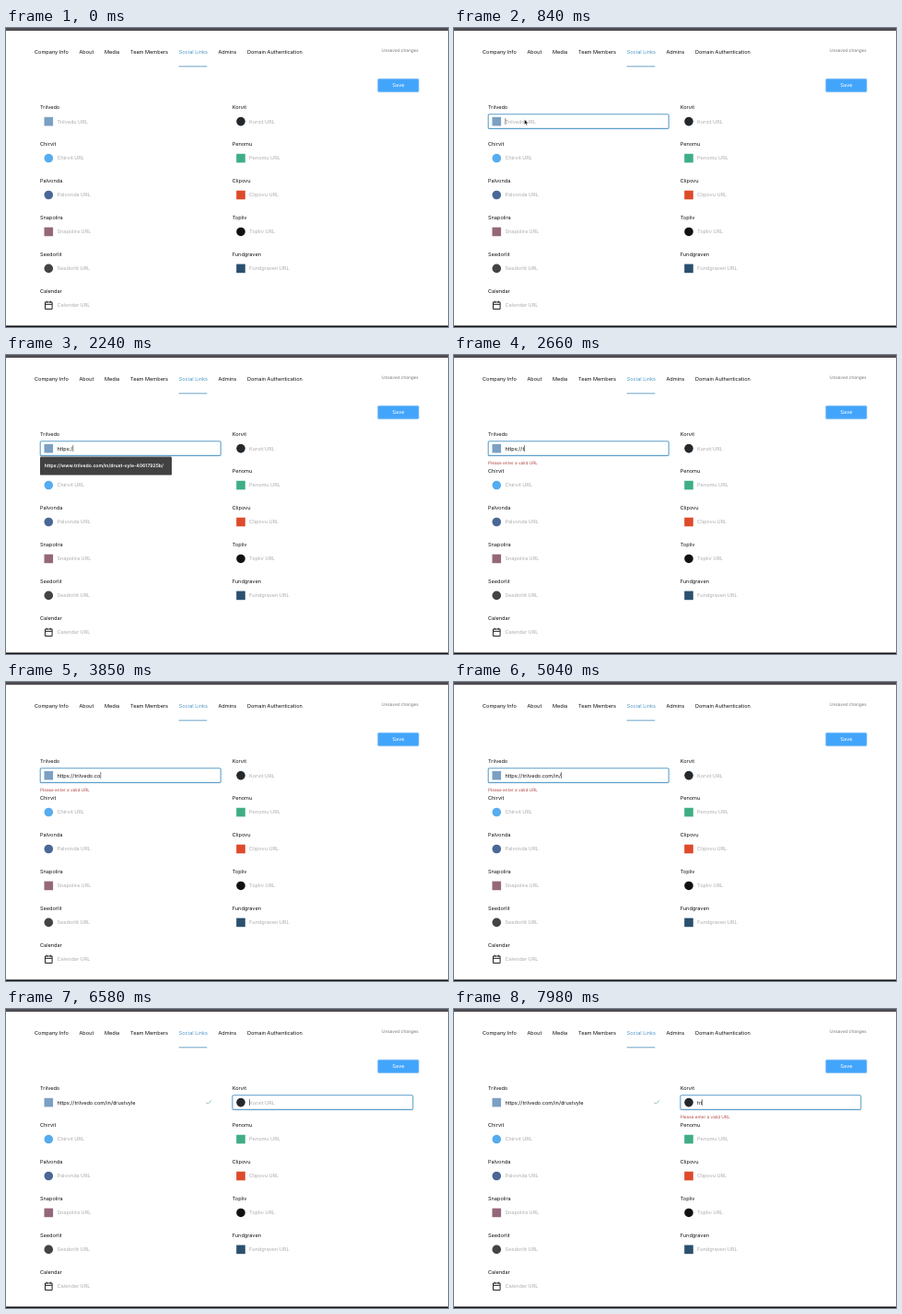
Write an HTML page that moves like this. It is 480 by 325 pixels and loops after 8000 ms.

```html
<!DOCTYPE html>
<html lang="en">
<head>
<meta charset="utf-8">
<title>Social links form</title>
<style>
  html, body { margin: 0; width: 100%; height: 100%; overflow: hidden; background: #fff; }
  svg { display: block; width: 480px; height: 325px; }
  text { font: 400 5.58px Inter, sans-serif; fill: #111; text-rendering: geometricPrecision; white-space: pre; }
  .hint { font-size: 5.5px; font-weight: 500; fill: #b8b8b8; }
  .value { font-size: 5.6px; }
  .active { fill: #4f96c8; }
  .note { font-size: 4.72px; fill: #777; }
  .error { font-size: 4.72px; fill: #b04a42; }
  .save { fill: #fff; text-anchor: middle; }
  .tip { font-size: 5.1px; font-weight: 600; fill: #fff; }
</style>
</head>
<body>
<svg id="stage" viewBox="0 0 480 325">
  <rect width="480" height="325" fill="#fff"/>
  <rect width="480" height="3" fill="#504d52"/>
  <rect y="323.5" width="480" height="1.5" fill="#111"/>
</svg>
<script>
const LOOP = 8000;
const stage = document.getElementById('stage');

function add(tag, attrs, content = '') {
  const node = document.createElementNS('http://www.w3.org/2000/svg', tag);
  for (const key in attrs) node.setAttribute(key, attrs[key]);
  node.textContent = content;
  return stage.appendChild(node);
}
const label = (x, y, content, cls = '') => add('text', { x, y, class: cls }, content);
const show = (node, opacity) => node.setAttribute('opacity', Number(opacity));
const clamp = v => Math.min(1, Math.max(0, v));

// Header
[[31, 'Company Info'], [79.5, 'About'], [107, 'Media'], [135, 'Team Members'],
 [187.7, 'Social Links', 'active'], [230.5, 'Admins'], [262, 'Domain Authentication']]
  .forEach(([x, name, cls]) => label(x, 27.7, name, cls));
add('rect', { x: 187.7, y: 41.3, width: 30.6, height: 1, fill: '#6aa6c6' });
label(408, 26.4, 'Unsaved changes', 'note');
add('rect', {
  x: 403.8, y: 55.2, width: 44.4, height: 14.2, rx: 1.2,
  fill: '#42a5fb', stroke: '#7dbdf3', 'stroke-width': .6
});
label(426, 64.3, 'Save', 'save');

// Form
function icon(x, y, shape, fill) {
  if (shape === 'circle') add('circle', { cx: x, cy: y, r: 4.8, fill });
  else if (shape === 'square') add('rect', { x: x - 4.8, y: y - 4.8, width: 9.6, height: 9.6, fill });
  else add('path', {
    d: `M${x - 3.8} ${y - 3.4}h7.6v7.6h-7.6zM${x - 3.8} ${y - 1}h7.6M${x - 2} ${y - 4.7}v2M${x + 2} ${y - 4.7}v2`,
    fill: 'none', stroke: '#222', 'stroke-width': 1
  });
}

function field(left, row, [name, shape, color]) {
  const y = 101.6 + row * 39.95;
  const textX = left + 18.4;
  label(left, y - 13.4, name);
  const ring = add('rect', {
    x: left + .2, y: y - 7.9, width: 196, height: 15.7, rx: 1.2,
    fill: '#fff', stroke: '#5d9fca', 'stroke-width': 1.1, opacity: 0
  });
  icon(left + 9.3, y, shape, color);
  const hint = label(textX, y + 1.9, name + ' URL', 'hint');
  const value = label(textX, y + 1.9, '', 'value');
  const caret = add('rect', { y: y - 3.6, width: .6, height: 7, fill: '#333', opacity: 0 });
  const error = label(left, y + 17.2, 'Please enter a valid URL', 'error');
  show(error, 0);

  return function update({ text, focus, caretOn, invalid }) {
    value.textContent = text;
    show(hint, !text);
    show(ring, focus);
    show(caret, caretOn);
    show(error, invalid);
    caret.setAttribute('x', textX + .2 + (text ? value.getComputedTextLength() : 0));
  };
}

const leftFields = [
  ['Trilvedo', 'square', '#7ba0c4'], ['Chirvit', 'circle', '#55acee'],
  ['Palvonda', 'circle', '#4a6797'], ['Snapolira', 'square', '#94687a'],
  ['Seedorlit', 'circle', '#444'], ['Calendar', 'calendar']
].map((item, row) => field(37, row, item));
const rightFields = [
  ['Korvit', 'circle', '#24292e'], ['Penomu', 'square', '#3fae85'],
  ['Clipovu', 'square', '#dd4b2b'], ['Topliv', 'circle', '#111'],
  ['Fundgraven', 'square', '#2b506e']
].map((item, row) => field(245.7, row, item));

const check = add('path', {
  d: 'M217.4 101.5l1.8 1.8 3.8-4', fill: 'none', stroke: '#8fbfae', 'stroke-width': 1
});
const tip = [
  add('rect', { x: 37, y: 110.6, width: 143, height: 20, rx: 1.2, fill: '#414141' }),
  label(41.8, 122.4, 'https://www.trilvedo.com/in/drust-vyle-40617925b/', 'tip')
];
const pointer = add('path', {
  d: 'M0 0v5.6l1.3-1.2 .9 2 .9-.4-.9-1.9h1.8z', fill: '#111', stroke: '#fff', 'stroke-width': .35
});

// Typing bursts: first key, last key, number of keys
const URL_TEXT = 'https://trilvedo.com/in/drustvyle';
const BURSTS = [[1260, 1960, 6], [2240, 2380, 2], [2660, 3640, 9], [3710, 3990, 3],
  [4200, 4200, 1], [4760, 5040, 3], [5390, 6160, 8], [6300, 6300, 1]];

function keysTyped(t) {
  return BURSTS.reduce((sum, [from, to, keys]) => {
    if (t < from) return sum;
    if (t >= to) return sum + keys;
    return sum + 1 + Math.floor((t - from) / (to - from) * (keys - 1));
  }, 0);
}

function render(t) {
  const first = t >= 630 && t < 6440;
  const second = t >= 6440;
  leftFields[0]({
    text: URL_TEXT.slice(0, keysTyped(t)),
    focus: first, caretOn: first, invalid: t >= 2660 && t < 6440
  });
  rightFields[0]({
    text: t >= 7980 ? 'ht' : t >= 7910 ? 'h' : '',
    focus: second ? clamp((t - 6370) / 140) : 0,
    caretOn: second && !(t >= 7000 && t < 7490),
    invalid: t >= 7910
  });
  tip.forEach(node => show(node, t >= 1260 && t < 2660));
  show(check, clamp((t - 6440) / 140));

  const away = (1 - clamp((t - 70) / 560)) ** 2;
  show(pointer, t >= 70 && t < 1260);
  pointer.setAttribute('transform', `translate(${76.5 + 110 * away} ${99.4 + 95 * away})`);
}

const start = performance.now();
function tick() {
  render((performance.now() - start) % LOOP);
  requestAnimationFrame(tick);
}
tick();
</script>
</body>
</html>
```
